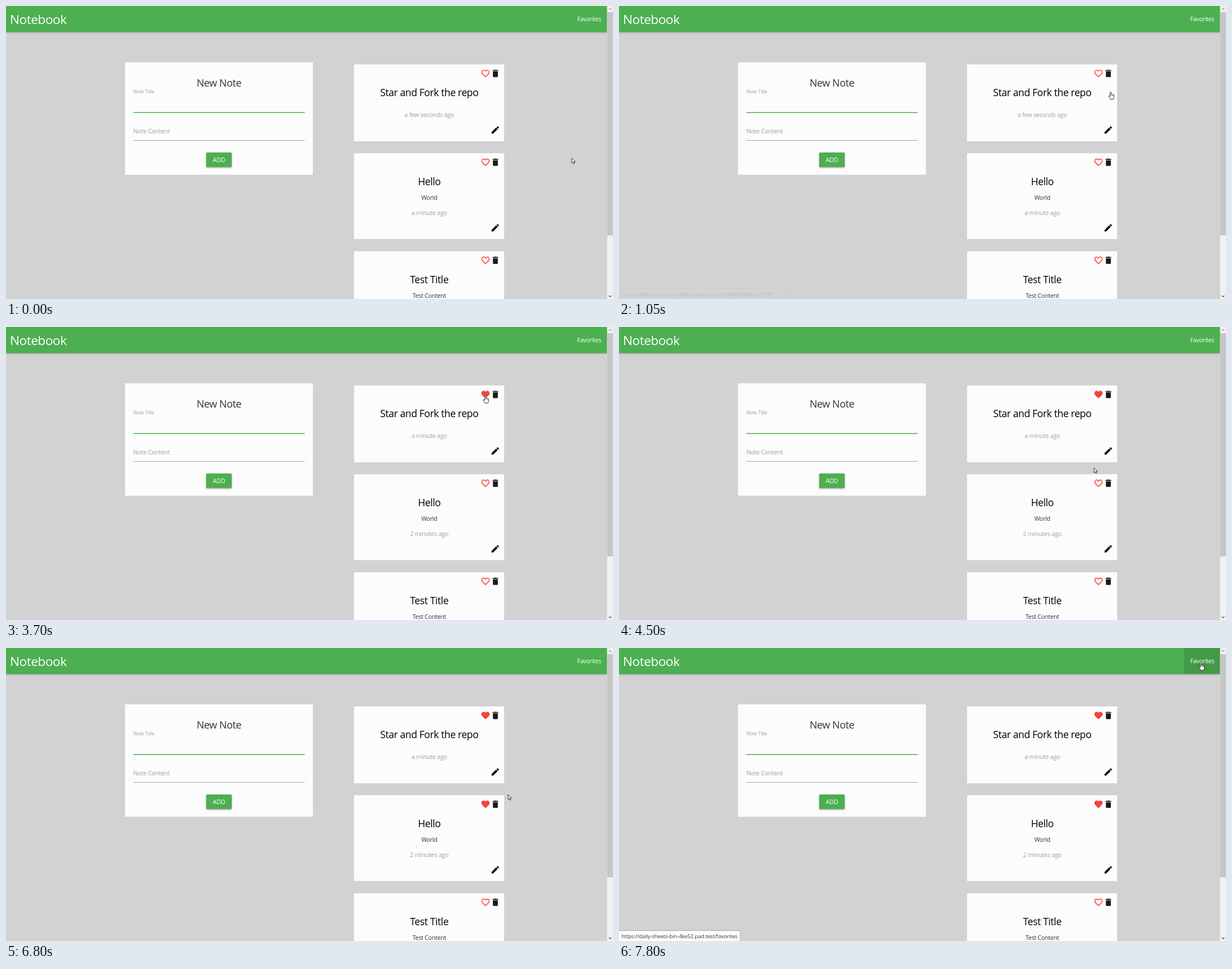
Animation, 1076 px wide and 520 px high, one loop 8000 ms. Source, as an HTML page with a canvas:

```html
<!DOCTYPE html>
<html lang="en">
<head>
<meta charset="utf-8">
<title>Notebook</title>
<style>
html, body { margin: 0; width: 100%; height: 100%; overflow: hidden; background: #d2d2d2; }
canvas { display: block; }
</style>
</head>
<body>
<canvas id="stage" width="1076" height="520"></canvas>
<script>
const ctx = document.getElementById('stage').getContext('2d');
const LOOP = 8000, STEP = 50;
const GREEN = '#4caf50', RED = '#f44336', GREY = '#9e9e9e', PAPER = '#fcfcfc';
const SITE = 'https://daily-sheets-bin-4ke52.pad.test/';

// Icons on a 24 unit grid
const HEART = new Path2D('M12 21.35l-1.45-1.32C5.4 15.36 2 12.28 2 8.5 2 5.42 4.42 3 7.5 3c1.74 0 3.41.81 4.5 2.09C13.09 3.81 14.76 3 16.5 3 19.58 3 22 5.42 22 8.5c0 3.78-3.4 6.86-8.55 11.54z');
const TRASH = new Path2D('M6 19q0 2 2 2h8q2 0 2-2V7H6zM19 4h-3.5l-1-1h-5l-1 1H5v2h14z');
const PENCIL = new Path2D('M3 17.25V21h3.75L17.81 9.94l-3.75-3.75zM20.71 7.04q.7-.7 0-1.41l-2.34-2.34q-.7-.7-1.41 0l-1.83 1.83 3.75 3.75z');

// Pointers, with the hot spot at 0,0
const ARROW = new Path2D('M0 0V8.6L2 6.9 3.5 10.2 4.9 9.6 3.5 6.4H6z');
const HAND = new Path2D('M-1 1Q0-.8 1 1V5Q2 4 3 5.2 4 4.5 4.7 5.8 6 5.4 6 7V9.5Q6 11 5 12V13.5H-.8V12.3L-3.8 8.4Q-4-6.6 -1 8.4z'.replace('Q-4-6.6 -1 8.4', 'Q-3.4 6.4 -1 8.4'));

// Pointer track: time, x, y
const TRACK = [
  [0, 1003, 270], [100, 1003, 270], [900, 898, 228], [1000, 869, 214],
  [1050, 871.5, 152], [1500, 850, 121.5], [3650, 850, 121.5], [3700, 849.5, 121.5],
  [4500, 842, 250], [4600, 842, 250], [4950, 850, 279.5], [6150, 850, 279.5],
  [6200, 849.5, 279.5], [6450, 849.5, 279.5], [6800, 890, 260],
  [7300, 1026, 48], [7800, 1031.5, 26], [LOOP, 1031.5, 26]
];
const HAND_TIMES = [[1000, 3800], [4850, 6600], [7350, LOOP]];

const clamp = v => Math.max(0, Math.min(1, v));
const ramp = (t, from, to) => clamp((t - from) / (to - from));

function pointerAt(t) {
  const i = Math.max(1, TRACK.findIndex(k => k[0] > t));
  const [t0, x0, y0] = TRACK[i - 1], [t1, x1, y1] = TRACK[i];
  const u = ramp(t, t0, t1), e = u * u * (3 - 2 * u);
  return [x0 + (x1 - x0) * e, y0 + (y1 - y0) * e];
}

function rect(x, y, w, h, color) {
  ctx.fillStyle = color;
  ctx.fillRect(x, y, w, h);
}

function text(str, x, y, size, color, align = 'center') {
  ctx.font = size + 'px "Open Sans", "Noto Sans", sans-serif';
  ctx.letterSpacing = (-0.022 * size) + 'px';
  ctx.textAlign = align;
  ctx.fillStyle = color;
  ctx.fillText(str, x, y);
}

function raised(draw) {
  ctx.save();
  ctx.shadowColor = 'rgba(0,0,0,.45)';
  ctx.shadowBlur = 3;
  ctx.shadowOffsetY = 1.3;
  ctx.fillStyle = GREEN;
  draw();
  ctx.restore();
}

function icon(path, cx, cy, color, outline) {
  ctx.save();
  ctx.translate(cx, cy);
  ctx.scale(0.73, 0.73);
  ctx.translate(-12, -12);
  if (outline) {
    ctx.clip(path);
    ctx.strokeStyle = color;
    ctx.lineWidth = 4;
    ctx.stroke(path);
  } else {
    ctx.fillStyle = color;
    ctx.fill(path);
  }
  ctx.restore();
}

function card(y, h, title, body, age, liked) {
  rect(617, y, 266, h, PAPER);
  icon(HEART, 850, y + 16, RED, !liked);
  icon(TRASH, 867.5, y + 16, '#1a1a1a');
  icon(PENCIL, 867.3, y + h - 20, '#000');
  text(title, 750.3, y + 56.7, 17.5, '#000');
  if (body) text(body, 750.3, y + 82.2, 10.6, '#333');
  text(age, 750.3, y + h - 43, 10.8, GREY);
}

function form() {
  rect(211, 100, 333, 199.5, PAPER);
  text('New Note', 377.5, 142.7, 17.9, '#333');
  text('Note Title', 225.5, 155.3, 8.7, GREY, 'left');
  rect(225.5, 188.3, 304, 1.5, GREEN);
  text('Note Content', 225.5, 226.2, 10.8, GREY, 'left');
  rect(225.5, 238, 304, 0.9, GREY);
  raised(() => {
    ctx.beginPath();
    ctx.roundRect(355, 260, 45, 25.5, 1.5);
    ctx.fill();
  });
  text('ADD', 377.5, 276.7, 10.8, '#fff');
}

function header(hover) {
  raised(() => ctx.fillRect(-4, -4, 1074, 50));
  rect(1002, 0, 64, 46, `rgba(0,0,0,${0.12 * hover})`);
  text('Notebook', 7, 32, 22.6, '#fff', 'left');
  text('Favorites', 1033.8, 27, 10.6, '#fff');
}

function triangle(x, y, dir, color) {
  ctx.beginPath();
  ctx.moveTo(x - 2.3, y + dir);
  ctx.lineTo(x, y - dir * 1.2);
  ctx.lineTo(x + 2.3, y + dir);
  ctx.strokeStyle = color;
  ctx.lineWidth = 1.1;
  ctx.stroke();
}

function scrollbar() {
  rect(1065.5, 0, 10.5, 520, '#f1f1f1');
  rect(1065.5, 11, 10.5, 396, '#c6c6c6');
  triangle(1071, 5.5, 1, '#a3a3a3');
  triangle(1071, 515, -1, '#505050');
}

function status(path, w, alpha) {
  if (alpha <= 0) return;
  ctx.save();
  ctx.globalAlpha = alpha;
  rect(0, 501, w, 19, '#a8a8a8');
  rect(0, 502, w - 1, 18, '#fdfdfd');
  text(SITE + path, 4, 515, 9.7, '#3c3c3c', 'left');
  ctx.restore();
}

function pointer(t) {
  const shape = HAND_TIMES.some(([a, b]) => t >= a && t < b) ? HAND : ARROW;
  ctx.save();
  ctx.translate(...pointerAt(t));
  ctx.lineJoin = 'round';
  ctx.lineWidth = 0.9;
  ctx.strokeStyle = '#222';
  ctx.fillStyle = '#fff';
  ctx.fill(shape);
  ctx.stroke(shape);
  if (shape === HAND) {
    ctx.lineWidth = 0.6;
    ctx.beginPath();
    for (const x of [1, 3, 4.7]) {
      ctx.moveTo(x, 5.3);
      ctx.lineTo(x, 7.5);
    }
    ctx.stroke();
  }
  ctx.restore();
}

function draw(t) {
  const later = t >= 2600;
  rect(0, 0, 1076, 520, '#d2d2d2');
  form();
  card(103.7, 136.3, 'Star and Fork the repo', '', later ? 'a minute ago' : 'a few seconds ago', later);
  card(261.3, 152.3, 'Hello', 'World', later ? '2 minutes ago' : 'a minute ago', t >= 5700);
  card(435.3, 152.3, 'Test Title', 'Test Content', '', false);
  header(ramp(t, 7300, 7550));
  scrollbar();
  status('edit/Mk4Qw82LpVz7Rt', 294, t >= 1000 ? 0.14 * (1 - ramp(t, 1050, 1200)) : 0);
  status('favorites', 215.5, ramp(t, 7400, 7600));
  pointer(t);
}

function frame(now) {
  const t = now % LOOP;
  draw(t - t % STEP);
  requestAnimationFrame(frame);
}
requestAnimationFrame(frame);
</script>
</body>
</html>
```
